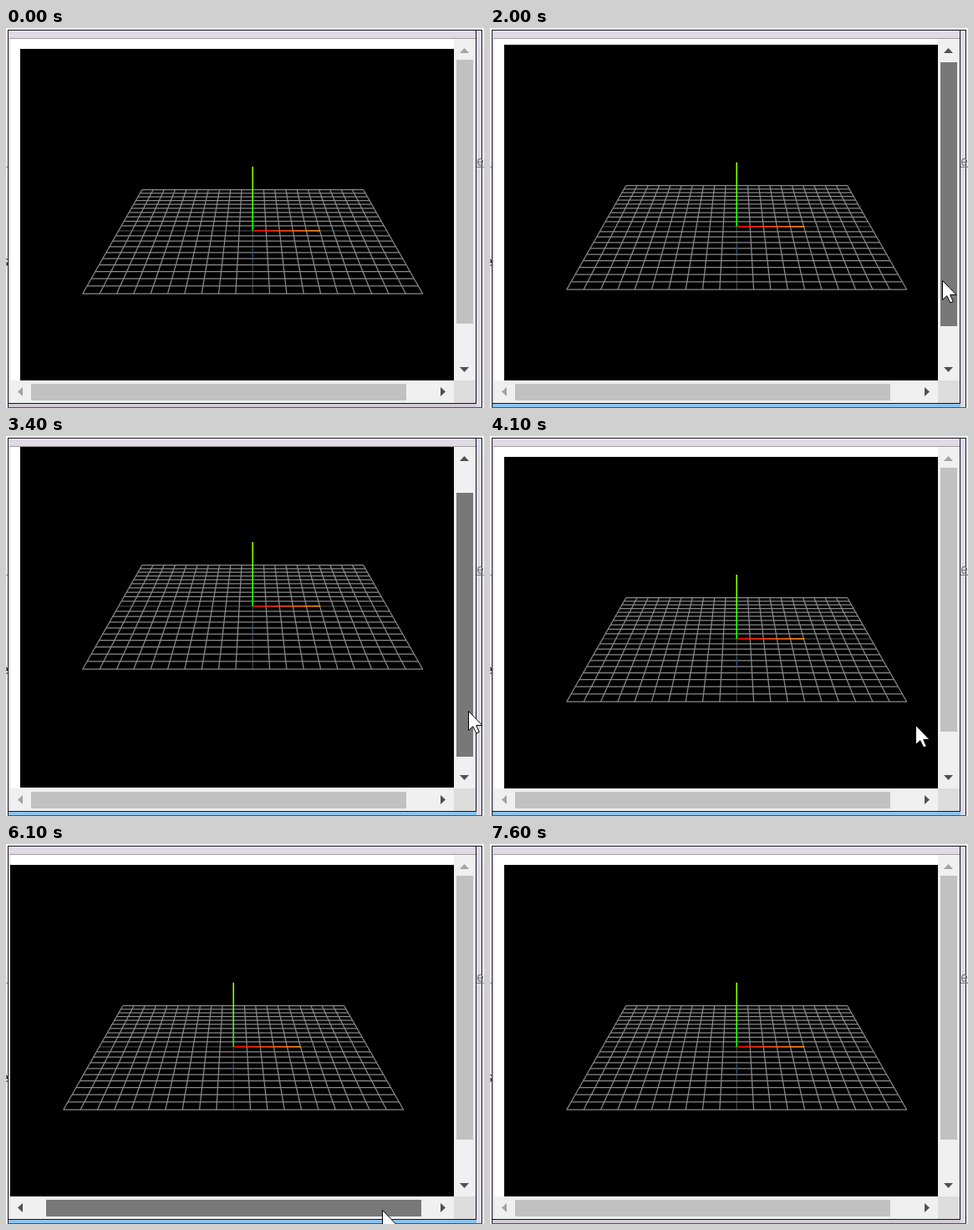
Recreate the animation shown at these times as an HTML page with a canvas. Size 572 px wide and 455 px high, loop 7.7 s.

```html
<!DOCTYPE html>
<html lang="en">
<head>
<meta charset="utf-8">
<title>Scrolling a 3D view</title>
<style>
html, body { margin: 0; width: 100%; height: 100%; overflow: hidden; background: #fff; }
canvas { display: block; width: 572px; height: 455px; }
</style>
</head>
<body>
<canvas id="stage" width="572" height="455"></canvas>
<script>
const ctx = document.getElementById('stage').getContext('2d');
const LOOP = 7700, STEP = 100;
const MAX_X = 37, MAX_Y = 56;

// Pointer path: time, x, y
const path = [
  [400, 362, 64], [1100, 471, 250], [1500, 541, 299], [1900, 541, 299],
  [2000, 541, 302], [2500, 549, 357], [2600, 549, 357], [2700, 549, 362],
  [3000, 549, 362], [3800, 556, 296], [4100, 509, 346], [4400, 427, 437],
  [4500, 427, 437], [4700, 431, 435], [4900, 431, 435], [5200, 457, 435],
  [5500, 472, 437], [5900, 472, 437], [6300, 428, 438], [6700, 467, 296],
  [6900, 555, 250], [7000, 590, 232]
];

const clamp = (v, max) => Math.max(0, Math.min(max, v));
const within = (t, a, b) => t >= a && t <= b;

function pointerAt(t) {
  const i = path.findIndex(p => p[0] > t);
  if (i < 1) return null;
  const [t0, x0, y0] = path[i - 1], [t1, x1, y1] = path[i];
  const k = (t - t0) / (t1 - t0);
  return { x: Math.round(x0 + (x1 - x0) * k), y: Math.round(y0 + (y1 - y0) * k) };
}

function box(color, x, y, w, h) {
  ctx.fillStyle = color;
  ctx.fillRect(x, y, w, h);
}

function shape(color, points) {
  ctx.beginPath();
  points.forEach(([x, y]) => ctx.lineTo(x, y));
  ctx.closePath();
  ctx.fillStyle = color;
  ctx.fill();
}

function line(color, x0, y0, x1, y1) {
  ctx.beginPath();
  ctx.moveTo(x0, y0);
  ctx.lineTo(x1, y1);
  ctx.strokeStyle = color;
  ctx.stroke();
}

function axis(from, to, x0, y0, x1, y1) {
  const g = ctx.createLinearGradient(x0, y0, x1, y1);
  g.addColorStop(0, from);
  g.addColorStop(1, to);
  line(g, x0, y0, x1, y1);
}

// Floor line n (0 back, 20 front) in perspective: its y and half width
function row(n) {
  const half = 0.5 / (1 / 265 + (1 / 407 - 1 / 265) * n / 20);
  return { half, y: 193.7 + (half - 132.5) / 71 * 124.5 };
}

function drawScene(sx, sy) {
  ctx.save();
  ctx.beginPath();
  ctx.rect(5, 13, 531, 409);
  ctx.clip();
  ctx.translate(-sx, -sy);
  box('#000', 17, 25, 556, 435);
  ctx.lineWidth = 1.25;
  const cx = 295.2, back = row(0), front = row(20), mid = row(10).y;
  const gridLines = n => {
    const { half, y } = row(n), k = n / 10 - 1;
    const color = n === 10 ? '#444' : '#8a8a8a';
    line(color, cx - half, y, cx + half, y);
    line(color, cx + back.half * k, back.y, cx + front.half * k, front.y);
  };
  gridLines(10);
  for (let n = 0; n <= 20; n++) if (n !== 10) gridLines(n);
  line('#1c4a78', cx, 265, cx, row(15).y);
  ctx.lineWidth = 1.6;
  axis('#f00', '#f90', cx, mid, cx + 81, mid);
  axis('#0f0', '#9f0', cx, mid, cx, 166);
  ctx.restore();
}

const thumbColor = (over, held) => held ? '#787878' : over ? '#a8a8a8' : '#c1c1c1';
const arrowColor = on => on ? '#505050' : '#a3a3a3';

function drawBars(sx, sy, p, holdX, holdY) {
  box('#f0f0f0', 536, 13, 26, 409);
  box('#f0f0f0', 5, 422, 531, 27);
  box('#dcdcdc', 536, 422, 26, 27);
  const tx = 30 + Math.floor(sx * 30.5 / MAX_X), ty = 38 + Math.floor(sy * 44 / MAX_Y);
  const overY = p && within(p.x, 539, 558) && within(p.y, ty, ty + 316);
  const overX = p && within(p.y, 426, 445) && within(p.x, tx, tx + 449);
  box(thumbColor(overY, holdY), 539, ty, 20, 316);
  box(thumbColor(overX, holdX), tx, 426, 449, 20);
  shape(arrowColor(sy > 0), [[543, 30], [554, 30], [548.5, 24]]);
  shape(arrowColor(sy < MAX_Y), [[543, 406], [554, 406], [548.5, 412]]);
  shape(arrowColor(sx > 0), [[20, 430], [20, 441], [14, 435.5]]);
  shape(arrowColor(sx < MAX_X), [[520, 430], [520, 441], [526, 435.5]]);
}

function drawFrame(active) {
  box('#fff', 0, 0, 572, 455);
  ctx.fillStyle = '#222';
  ctx.font = '16px "Open Sans", sans-serif';
  ctx.textAlign = 'right';
  ctx.fillText(active ? 'e' : 's', 3, 285);
  box('#5fa5a0', 0, 166, 2, 1);
  box('#dfdae3', 2, 2, 568, 453);
  box('#d8dcf0', 565, 3, 4, 20);
  box('#fff', 5, 13, 531, 409);
  box('#a0a0a0', 4, 12, 558, 1);
  box(active ? '#8cc4f2' : '#d2cbd8', 3, 450, 560, 4);
  const edge = '#15131c';
  box(edge, 2, 2, 568, 1);
  box(edge, 2, 2, 1, 453);
  box(edge, 562, 2, 1, 448);
  box(edge, 569, 2, 1, 453);
  box(edge, 2, 449, 561, 1);
  box('#55505c', 2, 454, 568, 1);
  ctx.textAlign = 'left';
  ctx.fillStyle = '#77737c';
  ctx.fillText('e', 563, 165);
  box('#77737c', 563, 166, 9, 1);
}

function drawPointer({ x, y }) {
  ctx.save();
  ctx.translate(x + 0.5, y + 0.5);
  shape('#fff', [[0, 0], [0, 23], [5.3, 18.2], [9.3, 26.5], [12.8, 25], [9.2, 17], [16.5, 17]]);
  ctx.lineWidth = 1;
  ctx.strokeStyle = '#000';
  ctx.stroke();
  ctx.restore();
}

function draw(t) {
  const p = pointerAt(t);
  const holdY = within(t, 2000, 3800), holdX = within(t, 5000, 6300);
  const sy = holdY ? Math.round(clamp((p.y - 298.1) * MAX_Y / 44, MAX_Y)) : 0;
  const sx = holdX ? Math.round(clamp((p.x - 431) * MAX_X / 30.3, MAX_X)) : 0;
  drawFrame(within(t, 2000, 7500));
  drawScene(sx, sy);
  drawBars(sx, sy, p, holdX, holdY);
  if (p) drawPointer(p);
}

const start = performance.now();
function tick() {
  const t = (performance.now() - start) % LOOP;
  draw(Math.floor(t / STEP) * STEP);
  requestAnimationFrame(tick);
}
tick();
</script>
</body>
</html>
```
